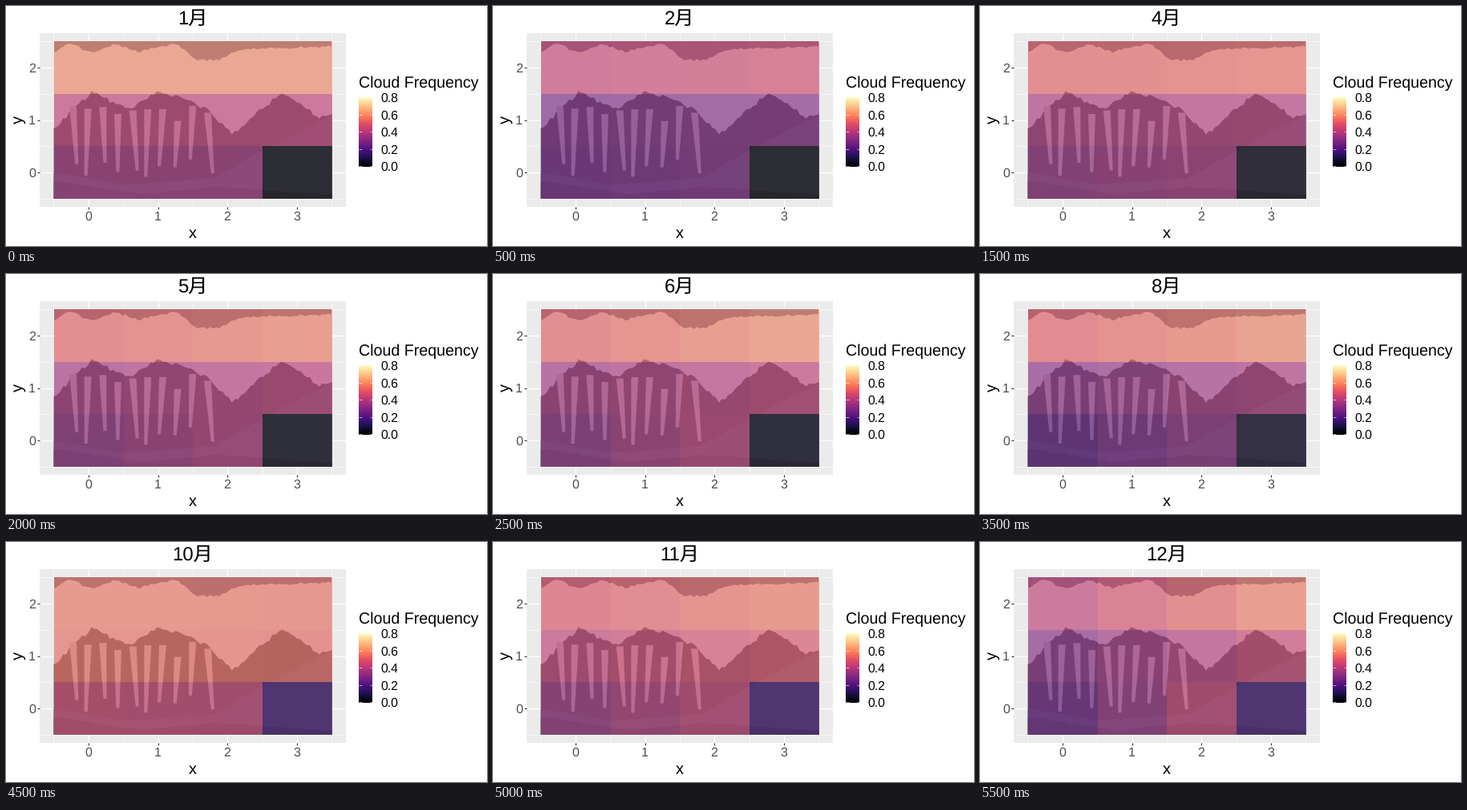
A matplotlib script for the animation above (6000 ms loop, 600x300 px).

```python
import numpy as np
import matplotlib.pyplot as plt
from matplotlib.animation import FuncAnimation
from matplotlib.patches import Polygon, Rectangle

plt.rcParams["font.family"] = ["Liberation Sans", "Noto Sans CJK JP"]
plt.rcParams["text.hinting"] = "no_hinting"
PT = 0.72  # points per pixel at 100 dpi
X0, X1, Y0, Y1 = 59.6, 406.4, 44, 241
rng = np.random.default_rng(5)

fig = plt.figure(figsize=(6, 3), dpi=100, facecolor="white")
ax = fig.add_axes([0, 0, 1, 1])
ax.axis("off")


def text(x, y, s, size, color="black", **kw):
    return ax.text(x, y, s, fontsize=size * PT, color=color, **kw)


def line(xs, ys, width, color="white", z=1):
    ax.plot(xs, ys, color=color, lw=width * PT, zorder=z,
            solid_capstyle="butt")


def rect(x0, y0, x1, y1, color, z):
    ax.add_patch(Rectangle((x0, y0), x1 - x0, y1 - y0, fc=color, lw=0,
                           zorder=z))


def shape(points, color):
    ax.add_patch(Polygon(points, fc=color, lw=0, zorder=3))


def ground(xs, ys, color, rough):
    """Fill from a rough outline down to the foot of the picture."""
    x = np.linspace(X0, X1, 90)
    y = np.interp(x, xs, ys) + rng.uniform(-rough, rough, x.size)
    shape([(X0, Y1), *zip(x, y), (X1, Y1)], color)


def px(x):
    return 102.8 + 86.7 * x


def py(y):
    return 208.2 - 65.67 * y


# Panel, grid and axes
rect(42, 34, 423.6, 251, "#ebebeb", 0)
for v in np.arange(-0.5, 4, 0.5):
    major = v == int(v)
    width = 1.2 if major else 0.6
    line([px(v)] * 2, [34, 251], width)
    if major:
        line([px(v)] * 2, [251, 253.8], 1.1, "#333333")
        text(px(v) - 0.3, 268, f"{v:.0f}", 16, "#4d4d4d", ha="center")
    if v <= 2.5:
        line([42, 423.6], [py(v)] * 2, width)
        if major:
            line([39.2, 42], [py(v)] * 2, 1.1, "#333333")
            text(36.8, py(v) + 5.7, f"{v:.0f}", 16, "#4d4d4d", ha="right")
text(232.8, 290, "x", 20, ha="center")
text(21, 142, "y", 20, ha="center", va="baseline", rotation=90,
     rotation_mode="anchor")

# Snowy mountain range in flat tones
rect(X0, Y0, X1, Y1, "#6c6c86", 2)
ground([60, 80, 105, 137, 165, 213, 238, 265, 290, 320, 385],
       [57, 47, 58, 48, 57, 47, 68, 67, 55, 53, 51], "#d2ced8", 1.5)
ground([60, 108, 150, 190, 250, 283, 345, 390],
       [152, 107, 130, 106, 128, 160, 108, 138], "#645e66", 3)
for x in np.linspace(84, 252, 10):
    top, bottom = rng.uniform(125, 145), rng.uniform(190, 222)
    bend = x + rng.uniform(-6, 6)
    shape([(x - 5, top), (x + 4, top), (bend + 2, bottom),
           (bend - 2, bottom)], "#bdb2ba")
ground([60, 150, 260, 320, 406], [208, 224, 215, 180, 136], "#6c6b76", 1)
ground([60, 170, 260, 406], [219, 235, 226, 236], "#5e5b64", 1)

# Legend
text(440, 102, "Cloud Frequency", 19.7)
ax.imshow(np.linspace(1, 0, 256)[:, None], cmap="magma", vmin=0, vmax=1,
          extent=(440, 457, 200.6, 114.2), aspect="auto", zorder=3)
for v in np.arange(0, 0.9, 0.2):
    y = 200.4 - 86 * v / 0.8
    for x in (440, 453.5):
        line([x, x + 3.5], [y, y], 0.6, z=4)
    text(467, y + 5.7, f"{v:.1f}", 15.8)

# Share of the scale per row, top to bottom, and its rise per column
KEY_MONTHS = [1, 2, 4, 6, 8, 10, 12]
ROWS = [[.76, .58, .68, .71, .70, .71, .64],
        [.54, .37, .50, .50, .44, .69, .48],
        [.46, .36, .46, .50, .37, .56, .49]]
LEAN = [0, .01, .01, .03, .03, -.005, .06]


def cloud(month):
    means = [[np.interp(month, KEY_MONTHS, row)] for row in ROWS]
    lean = np.interp(month, KEY_MONTHS, LEAN)
    grid = means + lean * np.outer([1, 1, 2], np.arange(4) - 1.5)
    grid[2, 3] = np.interp(month, [2, 8, 10], [0.01, 0.06, 0.2])
    return grid


tiles = ax.imshow(cloud(1), cmap="magma", vmin=0, vmax=1, alpha=0.58,
                  extent=(X0, X1, Y1, Y0), aspect="auto",
                  interpolation="nearest", zorder=5)
title = text(232.5, 23, "", 24, ha="center")
ax.set(xlim=(0, 600), ylim=(300, 0))


def update(i):
    tiles.set_data(cloud(i + 1))
    title.set_text(f"{i + 1}月")
    return tiles, title


anim = FuncAnimation(fig, update, frames=12, interval=500, repeat=True,
                     repeat_delay=0)
plt.show()
```
